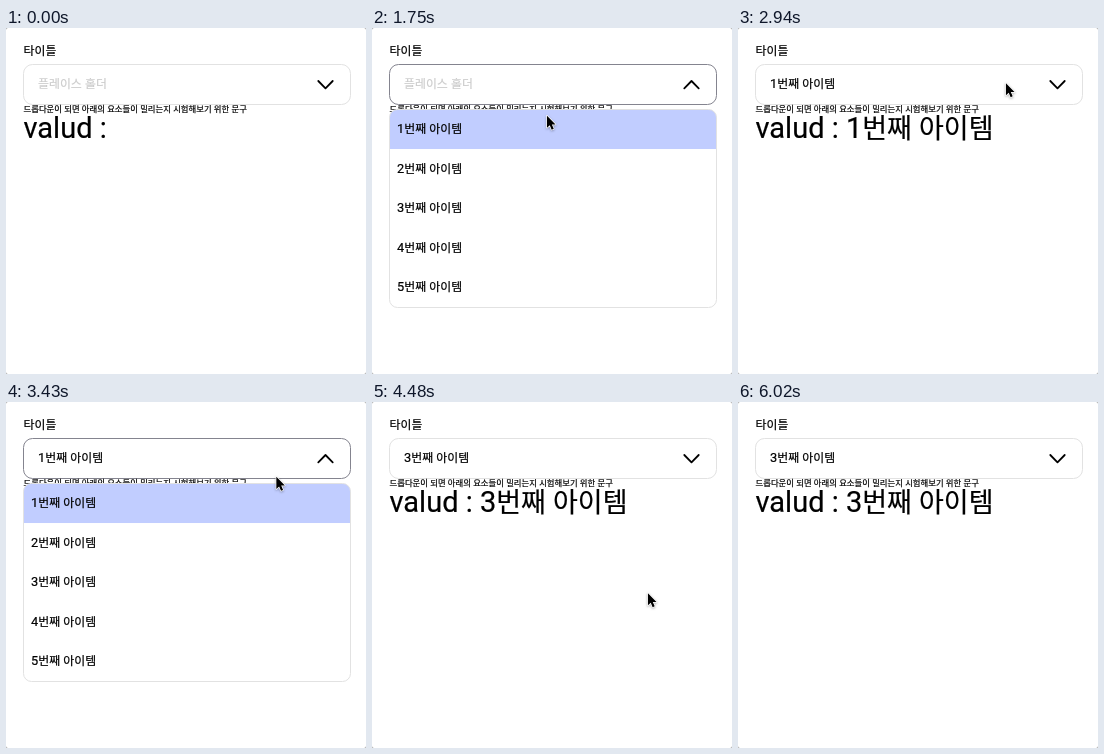
An HTML page for the animation above (6090 ms loop, 360x346 px).

```html
<!DOCTYPE html>
<html lang="ko">
<head>
<meta charset="utf-8">
<title>Dropdown</title>
<style>
  html, body { margin: 0; width: 100%; height: 100%; overflow: hidden; background: #999; }
  svg { display: block; width: 100vw; height: 100vh; }
  text {
    font: 12.8px Roboto, "Noto Sans CJK KR", "Noto Sans CJK", sans-serif;
    color: #000; fill: currentColor; stroke: currentColor; stroke-width: .2; white-space: pre;
  }
  tspan { font-size: .93em; }
  #title { font-size: 12.8px; font-weight: 500; }
  #note { font-size: 9px; }
  #value { font-size: 29px; }
  #field { fill: #fff; stroke: #e2e2e2; }
  #field.open { stroke: #84848f; }
  #field-text.empty { color: #ccc; }
  #arrow { fill: none; stroke: #000; stroke-width: 1.8; stroke-linecap: round; stroke-linejoin: round; }
  .row { fill: #fff; }
  .row.hot { fill: #c1cdff; }
  #frame { fill: none; stroke: #e2e2e2; }
  #ring { fill: none; stroke: #000; stroke-opacity: .6; stroke-width: 1.5; }
  #pointer path {
    stroke: #fff; stroke-width: 1.6; stroke-linejoin: round; paint-order: stroke;
    filter: drop-shadow(0 1px 1px rgba(0, 0, 0, .3));
  }
</style>
</head>
<body>
<svg viewBox="0 0 360 346">
  <defs><clipPath id="rounded"><rect x="17.5" y="81.5" width="327" height="198" rx="8"/></clipPath></defs>
  <rect width="360" height="346" rx="2" fill="#fff"/>
  <text id="title" x="17.5" y="27.2"></text>
  <rect id="field" x="17.5" y="36.5" width="327" height="40" rx="9"/>
  <text id="field-text" x="32" y="60.2"></text>
  <path id="arrow"/>
  <text id="note" x="17.5" y="84"></text>
  <text id="value" x="17.5" y="109.7"></text>
  <g id="list">
    <g id="rows" clip-path="url(#rounded)"></g>
    <rect id="frame" x="17.5" y="81.5" width="327" height="198" rx="8"/>
  </g>
  <g id="pointer">
    <circle id="ring" r="22.5"/>
    <path transform="translate(.5 -.5) scale(.9)" d="M.5 .8V14.2L3.6 11.4L5.7 16.3L8 15.3L5.9 10.5H10Z"/>
  </g>
</svg>
<script>
const LOOP = 6090, STEP = 70, CLICK = 140, ROW = 39.6, TOP = 81.5;
const ENTER = 70, LEAVE = 6020;
const $ = id => document.getElementById(id);
const item = n => `${n}번째 아이템`;

// Hangul is set slightly smaller than the Latin text around it.
const write = (el, s) => { el.innerHTML = s.replace(/[가-힣]+/g, '<tspan>$&</tspan>'); };

// Each visit to the list: two clicks, and the choice made between them.
const visits = [
  { click: 1120, open: 1190, hover: 1680, pick: 2450, close: 2520, choice: 1 },
  { click: 3080, open: 3150, hover: 3710, pick: 4340, close: 4480, choice: 3 }
];

const speedUp = k => k * k;
const slowDown = k => k * (2 - k);
const smooth = k => k * k * (3 - 2 * k);

const entry = [208, 284];
const moves = [
  { from: 70, until: 630, to: [166, 38], ease: slowDown },
  { from: 630, until: 910, to: [171, 62], ease: smooth },
  { from: 1470, until: 1960, to: [176, 104], ease: smooth },
  { from: 1960, until: 2100, to: [175, 101], ease: smooth },
  { from: 2590, until: 2800, to: [234, 18], ease: smooth },
  { from: 2800, until: 2940, to: [267, 55], ease: smooth },
  { from: 3220, until: 3710, to: [280, 162], ease: speedUp },
  { from: 3710, until: 3990, to: [275, 191], ease: slowDown },
  { from: 4620, until: 5250, to: [270, 82], ease: smooth },
  { from: 5250, until: 5320, to: [277, 67], ease: smooth },
  { from: 5320, until: 5950, to: [200, 333], ease: smooth }
];

function pointerAt(t) {
  let [x, y] = entry;
  for (const { from, until, to, ease } of moves) {
    if (t <= from) break;
    const k = ease(Math.min(1, (t - from) / (until - from)));
    x += (to[0] - x) * k;
    y += (to[1] - y) * k;
  }
  return [x, y];
}

write($('title'), '타이틀');
write($('note'), '드롭다운이 되면 아래의 요소들이 밀리는지 시험해보기 위한 문구');

function addRow(tag, attrs) {
  const el = document.createElementNS('http://www.w3.org/2000/svg', tag);
  for (const k in attrs) el.setAttribute(k, attrs[k]);
  return $('rows').appendChild(el);
}
const rows = [1, 2, 3, 4, 5].map(n => {
  const y = TOP + (n - 1) * ROW;
  const rect = addRow('rect', { class: 'row', x: 17, y, width: 328, height: ROW });
  write(addRow('text', { x: 25, y: y + 23.5 }), item(n));
  return rect;
});

function showState(t) {
  const visit = visits.find(v => t >= v.open && t < v.close);
  const chosen = visits.reduce((n, v) => t >= v.close ? v.choice : n, 0);
  const hovered = visit && t >= visit.hover ? visit.choice : 0;
  $('list').style.display = visit ? '' : 'none';
  $('field').classList.toggle('open', !!visit);
  $('field-text').classList.toggle('empty', !chosen);
  write($('field-text'), chosen ? item(chosen) : '플레이스 홀더');
  write($('value'), 'valud : ' + (chosen ? item(chosen) : ''));
  $('arrow').setAttribute('d', visit ? 'M312.3 60.3L319.5 53L326.7 60.3' : 'M312.3 53L319.5 60.3L326.7 53');
  rows.forEach((r, i) => r.classList.toggle('hot', i + 1 === chosen || i + 1 === hovered));
}

function showPointer(t) {
  const pressed = visits.some(v => [v.click, v.pick].some(c => t >= c && t < c + CLICK));
  $('pointer').style.display = t >= ENTER && t < LEAVE ? '' : 'none';
  $('pointer').setAttribute('transform', `translate(${pointerAt(t)})`);
  $('ring').style.display = pressed ? '' : 'none';
}

let shown = -1;
const start = performance.now();
function draw() {
  const now = Math.max(0, performance.now() - start) % LOOP;
  const t = Math.floor(now / STEP) * STEP;
  if (t !== shown) {
    showState(t);
    showPointer(t);
    shown = t;
  }
  requestAnimationFrame(draw);
}
draw();
</script>
</body>
</html>
```
